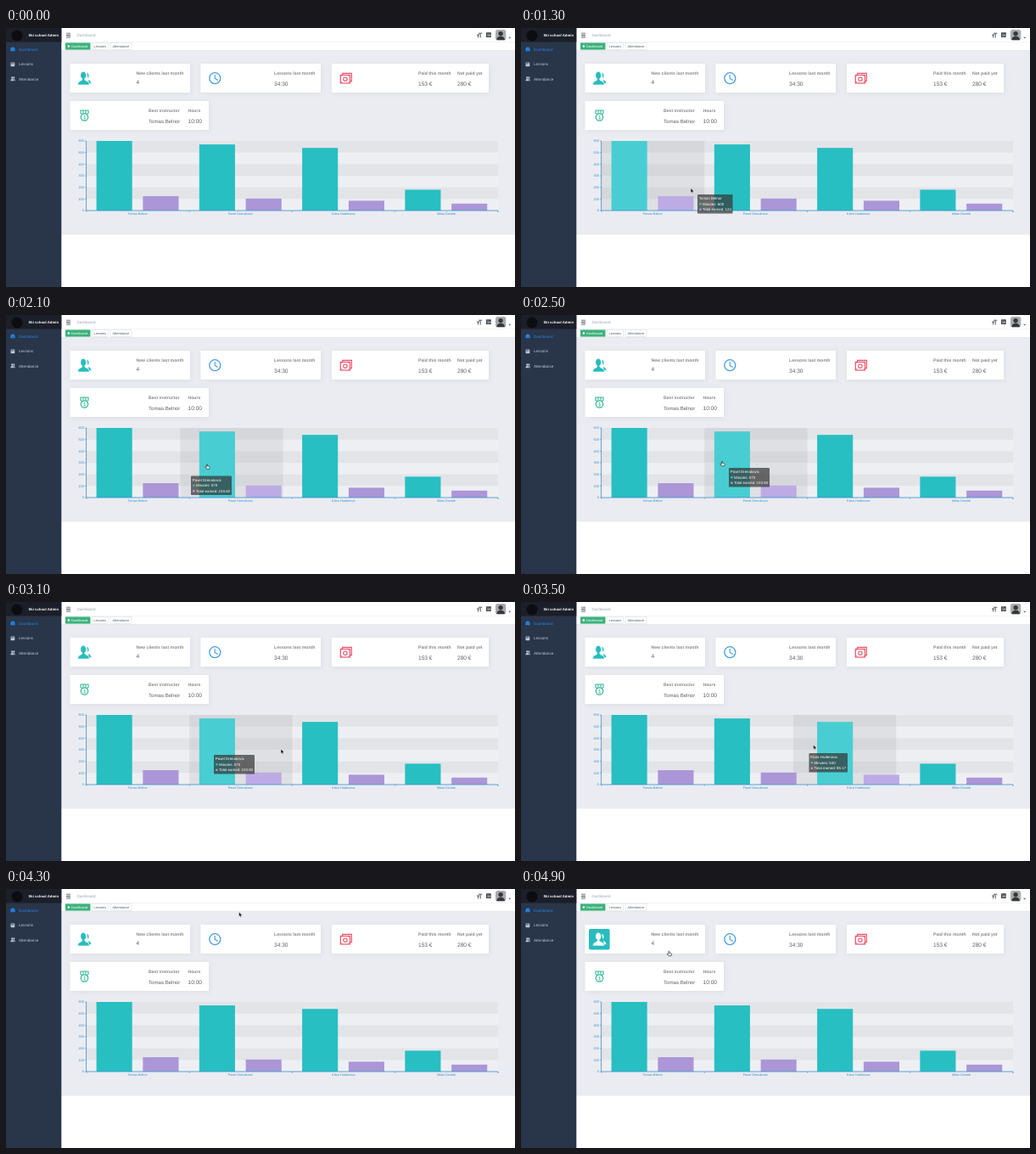
These frames come from a looping animation (600 by 305 pixels, 5000 ms). An HTML page:

```html
<!DOCTYPE html>
<html lang="en">
<head>
<meta charset="utf-8">
<title>Admin dashboard</title>
<style>
html, body { margin: 0; width: 100%; height: 100%; overflow: hidden; background: #fff; }
svg { display: block; width: 100%; height: 100%; }
text { font-family: "Liberation Sans", Arial, sans-serif; text-rendering: geometricPrecision; white-space: pre; }
.card { fill: #fff; filter: drop-shadow(1px 1px 3px rgba(0, 0, 0, .06)); }
</style>
</head>
<body>
<svg id="stage" viewBox="0 0 600 305"></svg>
<script>
const NS = "http://www.w3.org/2000/svg";
const stage = document.getElementById("stage");
const LOOP = 5000, STEP = 100;

function add(tag, attrs, parent = stage) {
  const el = document.createElementNS(NS, tag);
  set(el, attrs);
  parent.appendChild(el);
  return el;
}
function set(el, attrs) {
  for (const k in attrs) el.setAttribute(k, attrs[k]);
}
const group = (attrs = {}, parent = stage) => add("g", attrs, parent);
const rect = (x, y, width, height, fill, parent, more = {}) =>
  add("rect", { x, y, width, height, fill, ...more }, parent);
const circle = (cx, cy, r, fill, parent, more = {}) =>
  add("circle", { cx, cy, r, fill, ...more }, parent);
const path = (d, fill, parent, more = {}) => add("path", { d, fill, ...more }, parent);
const line = (d, stroke, width, parent) =>
  path(d, "none", parent, { stroke, "stroke-width": width });
function text(x, y, size, fill, str, parent, more = {}) {
  const el = add("text", { x, y, "font-size": size, fill, ...more }, parent);
  el.textContent = str;
  return el;
}
const bold = { "font-weight": 700 };

// Page areas
rect(0, 0, 600, 305, "#fff");
rect(65, 26.5, 535, 217, "#ebecf1");
rect(65, 16.4, 535, .5, "#e6e8ec");
rect(65, 26, 535, .6, "#dcdfe5");

// Sidebar
rect(0, 0, 65.3, 305, "#293548");
rect(0, 0, 65.3, 16.5, "#1b1f29");
circle(13, 9, 6.5, "#0c0d11");
text(26.5, 10, 4.25, "#fff", "Ski school Admin", stage, bold);
const BLUE = "#2185e8", PALE = "#bcc8d6";
path("M5.4 27.2V25a2.6 2.6 0 0 1 5.2 0v2.2Z", BLUE);
line("M8 26.4L9 24.4", "#293548", .5);
text(15, 26.7, 4.6, BLUE, "Dashboard");
rect(5.5, 40.4, 4.8, 4.8, PALE, stage, { rx: .6 });
line("M5.5 41.8H10.3M7.2 40.4V43", "#293548", .5);
text(15, 44.3, 4.6, PALE, "Lessons");
circle(7.4, 58.5, 1.3, PALE);
path("M5.3 62.3q0-2.4 2.1-2.4t2.1 2.4Z", PALE);
path("M9 57.3a1.2 1.2 0 0 1 .3 2.4q1.5.4 1.5 2.6h-.9q0-1.8-1.1-2.6Z", PALE);
text(15, 61.8, 4.6, PALE, "Attendance");

// Top bar
line("M71 6.2H76M73 8H76M73 9.4H76M71 11.2H76", "#555a63", .8);
path("M72.6 7.1V10.3L70.8 8.7Z", "#555a63");
text(83.5, 10, 4.5, "#97a3b5", "Dashboard");
line("M557 6.2H561.3M559.2 6.2V11.5M555 8H558.2M556.6 8V11.5", "#454a52", .9);
rect(566, 5.3, 5.8, 5.8, "#3f444c", stage, { rx: .5 });
line("M567.2 7H569M567.2 8.5H568.8M567.2 9.8H569M569.6 9.9V7.8H571V9.9", "#fff", .5);
rect(577, 2, 12.3, 12.3, "#a9abae", stage, { rx: 2.5 });
circle(583.1, 6.6, 2.7, "#35383c");
path("M578.4 14.3q0-4.2 4.7-4.7q4.8.5 4.8 4.7Z", "#35383c");
path("M592.2 10.8H595.2L593.7 12.6Z", "#5a5e66");

// Tabs
rect(70, 17.4, 29.5, 8.2, "#3cb27c");
circle(73.9, 21.5, 1.25, "#fff");
text(77, 22.9, 3.95, "#fff", "Dashboard");
function tab(x, w, label) {
  rect(x, 17.6, w, 7.8, "#fff", stage, { stroke: "#d3d7df", "stroke-width": .5 });
  text(x + 2.4, 22.9, 3.95, "#545a66", label);
}
tab(101.2, 19.3, "Lessons");
tab(123, 25, "Attendance");

// Cards
function card(x, y, w, fields) {
  rect(x, y, w, 34, "#fff", stage, { class: "card" });
  for (const [tx, title, value, dy = 26.3, size = 6.6] of fields) {
    text(tx, y + 13, 5.17, "#85878b", title, stage, bold);
    text(tx, y + dy, size, "#5d5f63", value);
  }
}
card(75.5, 42, 141.5, [[153.5, "New clients last month", "4", 24]]);
card(229.5, 42, 141.5, [[316, "Lessons last month", "34:30"]]);
card(384, 42, 185, [[486, "Paid this month", "153 €"], [532, "Not paid yet", "280 €"]]);
card(75.5, 86, 163.5, [[168, "Best instructor", "Tomas Belnor", 26.3, 6.1], [214.5, "Hours", "10:00"]]);

const TEAL = "#27bcbd";
const clientBox = rect(80, 47, 24.6, 24.6, TEAL, stage, { rx: 2 });
const people = group();
path("M95 52.3a3.4 4 0 0 1 1.2 7.4q.1.9 1.8 1.6q2.6 1 2.6 4.2h-3Z", null, people);
path("M90.7 51.2a3.9 4.6 0 0 1 2 8.5v1.2q.3.8 2.6 1.6q2.9 1 2.9 4.4H84.6q0-3.4 2.9-4.4q2.2-.8 2.3-1.6v-1.2a3.9 4.6 0 0 1 .9-8.5Z", null, people);
people.querySelectorAll("path").forEach(p => p.removeAttribute("fill"));

circle(246.3, 59.2, 6.5, "none", stage, { stroke: "#4a9fdc", "stroke-width": 1.3 });
line("M246.2 55V59.5L249.7 61.4", "#4a9fdc", 1.2);

const RED = "#e8536b";
line("M396.6 55V53.4H407.4V62.6H405.8", RED, 1.1);
rect(394.3, 55.4, 11.2, 9.6, "none", stage, { stroke: RED, "stroke-width": 1.2 });
circle(399.9, 60.2, 2.2, "none", stage, { stroke: RED, "stroke-width": 1.1 });
line("M395 57.4L396.3 56.1M403.5 56.1L404.8 57.4M395 63L396.3 64.3M403.5 64.3L404.8 63", RED, .7);

const GREEN = "#31b796";
line("M88 97V100.4L90 101.4M97 97V100.4L95 101.4M87.5 97H97.5M91 97V100.5M94 97V100.5", GREEN, 1.1);
circle(92.5, 105, 4.2, "none", stage, { stroke: GREEN, "stroke-width": 1.2 });
line("M91.6 103.9L92.8 103.1V106.8M91.4 106.9H94.1", GREEN, .8);

// Chart
const LEFT = 95, BASE = 215, UNIT = 82 / 600, CAT = 121.25, AXIS = "#3390c9";
const data = [
  ["Tomas Belnor", 600, 124, 41.5],
  ["Pavel Drenakovic", 570, 103.83, 48],
  ["Klara Hudenova", 540, 85.17, 45.5],
  ["Milan Dostek", 180, 60, 41]
];
for (let v = 0; v < 600; v += 100) {
  const dark = v % 200 === 100;
  rect(LEFT, BASE - (v + 100) * UNIT, CAT * 4, 100 * UNIT,
    dark ? "rgba(200,200,200,.24)" : "rgba(250,250,250,.2)");
}
const band = rect(LEFT, 133, CAT, 82, "rgba(150,150,150,.17)");
for (let v = 0; v <= 600; v += 100) {
  const y = BASE - v * UNIT;
  line(`M92.8 ${y}H${LEFT}`, AXIS, .5);
  text(91.8, y + 1.3, 3.8, AXIS, v, stage, { "text-anchor": "end" });
}
const bars = data.map(([name, minutes, earned], i) => {
  const x = LEFT + i * CAT;
  text(x + CAT / 2 - .4, 220.3, 3.8, AXIS, name, stage, { "text-anchor": "middle" });
  line(`M${x} ${BASE}V217`, AXIS, .5);
  return [[11.6, minutes], [66.4, earned]].map(([dx, v]) =>
    rect(x + dx, BASE - v * UNIT, 42.1, v * UNIT, "#000"));
});
line(`M${LEFT - .4} 133V${BASE}H580V217`, AXIS, .8);
const barFill = [["#27bfc2", "#48ced2"], ["#ab96d7", "#bdabe6"]];

// Tooltip
const tip = group();
const tipBox = rect(0, 0, 40, 22.6, "rgba(50,50,50,.7)", tip, { rx: 1.2 });
const tipLines = [[1.8, 6.2], [6, 12.8], [6, 19.3]].map(([x, y]) => text(x, y, 4.4, "#fff", "", tip));
circle(3.4, 11.2, 1.3, "#2ec7c9", tip);
circle(3.4, 17.7, 1.3, "#b6a2de", tip);

// Pointers
const outline = { stroke: "#fff", "stroke-width": .5, "stroke-linejoin": "round" };
const arrow = path("M0 0V5.7L1.3 4.5L2.2 6.5L3.1 6.1L2.3 4.2H4.1Z", "#111", stage, outline);
const hand = path("M-.6 .5q.6-.8 1.1 0V2.3l2.1.5q.6.2.5.9L2.6 5.8H-.6L-2 3.8q-.2-.8.5-.7l.9.7Z",
  "#fff", stage, { stroke: "#111", "stroke-width": .6, "stroke-linejoin": "round" });

const cursorKeys = [
  [1300, 200, 188.5], [1700, 200, 188.5], [2000, 213, 184], [2100, 237, 175.5],
  [2400, 237, 172], [3000, 237, 172], [3100, 324, 173], [3400, 334, 170],
  [3500, 344.5, 168], [3700, 344.5, 168], [3900, 340, 150], [4200, 288, 38],
  [4300, 274.5, 27], [4900, 174.5, 73]
];
const tipKeys = [
  [1300, 208, 196], [2000, 208, 196], [2100, 218, 189.5], [2300, 218, 189.5],
  [2400, 245, 180], [3100, 245, 180], [3200, 305, 180], [3400, 333, 179],
  [3500, 339.5, 178], [3600, 352.5, 176], [3700, 352.5, 176], [3900, 348, 158]
];
const bandKeys = [[1300, 95], [2000, 95], [2100, 205.4], [2300, 205.4],
  [2400, 216.25], [3400, 216.25], [3500, 321], [3600, 337.5]];

function at(keys, t) {
  const i = keys.findIndex(k => k[0] >= t);
  if (i < 0) return keys[keys.length - 1].slice(1);
  if (i === 0) return keys[0].slice(1);
  const a = keys[i - 1], b = keys[i], p = (t - a[0]) / (b[0] - a[0]);
  return a.slice(1).map((v, n) => v + (b[n + 1] - v) * p);
}
const show = (el, on) => set(el, { visibility: on ? "visible" : "hidden" });
const move = (el, [x, y]) => set(el, { transform: `translate(${x} ${y})` });

function draw(t) {
  const hover = t >= 1300 && t < 4000;
  const active = !hover ? -1 : t < 2100 ? 0 : t < 3500 ? 1 : 2;
  bars.forEach((pair, i) => pair.forEach((bar, n) =>
    set(bar, { fill: barFill[n][i === active ? 1 : 0] })));

  show(band, hover);
  show(tip, hover);
  if (hover) {
    const [name, minutes, earned, width] = data[active];
    set(band, { x: at(bandKeys, t)[0] });
    set(tipBox, { width });
    [name, `Minutes: ${minutes}`, `Total earned: ${earned}`].forEach((s, i) => tipLines[i].textContent = s);
    move(tip, at(tipKeys, t));
  }

  const onCard = Math.max(0, Math.min(1, (t - 4650) / 200));
  set(clientBox, { opacity: onCard });
  set(people, { fill: onCard > .4 ? "#fff" : TEAL, stroke: onCard > .4 ? TEAL : "#fff", "stroke-width": .5 });

  const pointing = (t >= 2100 && t < 3100) || t >= 4700;
  const pos = at(cursorKeys, t);
  show(arrow, t >= 1300 && !pointing);
  show(hand, pointing);
  move(arrow, pos);
  move(hand, pos);
}

const start = performance.now();
function frame() {
  const t = (performance.now() - start) % LOOP;
  draw(Math.floor(t / STEP) * STEP);
  requestAnimationFrame(frame);
}
frame();
</script>
</body>
</html>
```
